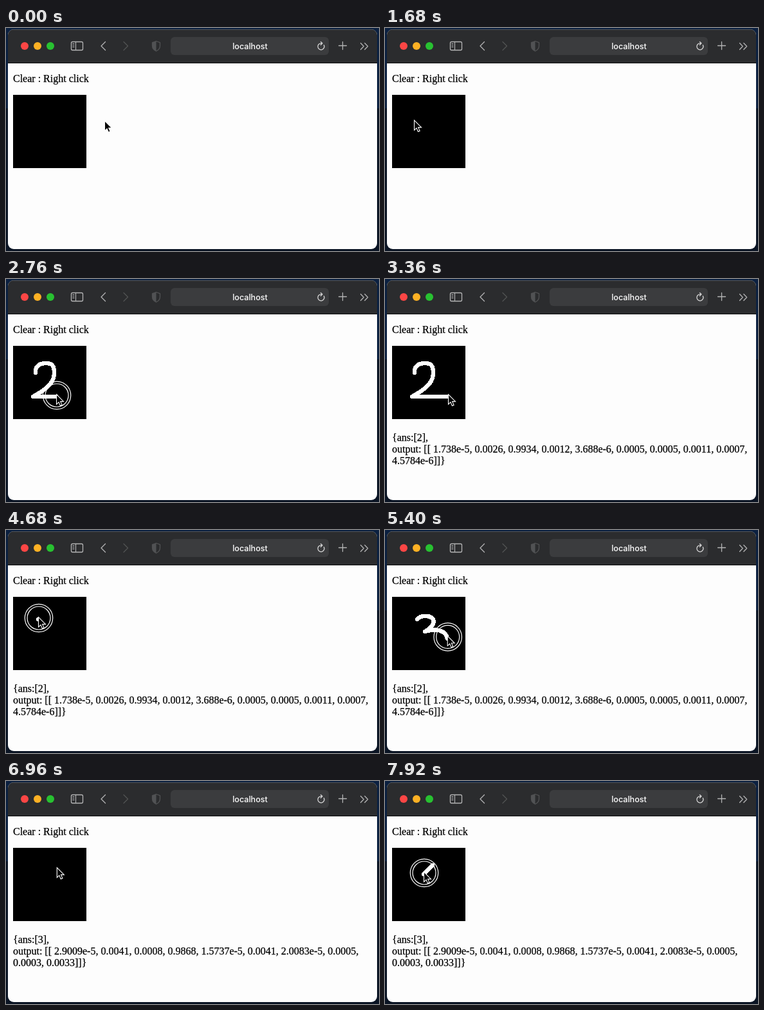
These frames come from a looping animation (580x347 px, 8000 ms). An HTML page:

```html
<!DOCTYPE html>
<html lang="en">
<head>
<meta charset="utf-8">
<title>Digit recognition demo</title>
<style>
  html, body { margin: 0; width: 100%; height: 100%; overflow: hidden; background: #0a1424; }
  svg { display: block; width: 580px; height: 347px; }
  .page { font: 16px "Liberation Serif", serif; stroke: #000; stroke-width: .25; white-space: pre; }
  .address { font: 500 12.6px Inter, sans-serif; fill: #fff; text-anchor: middle; }
  .icon { fill: none; stroke: #b4b4b5; stroke-width: 1.3; stroke-linecap: round; stroke-linejoin: round; }
  .dim { stroke: #515254; }
  #ink { fill: none; stroke: #fff; stroke-width: 6.5; stroke-linecap: round; stroke-linejoin: round; shape-rendering: crispEdges; }
</style>
</head>
<body>
<svg viewBox="0 0 580 347">
  <rect width="580" height="347" fill="#0a1424"/>
  <rect width="580" height="125" fill="#0b2040"/>

  <!-- Browser window -->
  <clipPath id="window"><rect x="3" y="2" width="574" height="342" rx="9"/></clipPath>
  <g clip-path="url(#window)">
    <rect width="580" height="347" fill="#fdfdfd"/>
    <rect width="580" height="54" fill="#2b2c2e"/>
    <rect y="2" width="580" height="1" fill="#555759"/>
    <rect y="54" width="580" height="1" fill="#0c0c0d"/>
  </g>
  <circle cx="29" cy="28" r="6" fill="#fc4645"/>
  <circle cx="49" cy="28" r="6" fill="#fdb124"/>
  <circle cx="69" cy="28" r="6" fill="#28c131"/>
  <g class="icon">
    <rect x="101.5" y="21.5" width="18" height="13" rx="2"/>
    <path d="M108.5 21.5v13M103.8 24.5h2.2M103.8 27h2.2M103.8 29.5h2.2" stroke-width="1.1"/>
    <path d="M154.5 21.5l-6.5 6.5 6.5 6.5"/>
    <path class="dim" d="M183 21.5l6.5 6.5-6.5 6.5"/>
    <path class="dim" d="M233.5 20.5l6 2.2v5.3q0 5-6 8-6-3-6-8v-5.3z"/>
  </g>
  <path d="M233.5 20.5l-6 2.2v5.3q0 5 6 8z" fill="#515254"/>
  <rect x="256" y="14" width="246" height="28" rx="6" fill="#3b3c3e"/>
  <text class="address" x="379.5" y="33">localhost</text>
  <g class="icon">
    <path d="M494.4 26.6a5 5 0 1 1-4.4-2.8h1.6M489.4 21.4l2.5 2.4-2.5 2.4" stroke="#d8d8d8"/>
    <path d="M523.5 21.5v12M517.5 27.5h12"/>
    <path d="M551.5 23.5l4.8 5-4.8 5M557.8 23.5l4.8 5-4.8 5"/>
  </g>

  <!-- Page -->
  <g class="page">
    <text x="11" y="84">Clear : Right click</text>
    <text id="line0" x="11" y="252"></text>
    <text id="line1" x="11" y="270"></text>
    <text id="line2" x="11" y="288"></text>
  </g>
  <rect x="11" y="104" width="114" height="114"/>
  <path id="ink"/>

  <!-- Pointer: its tip sits just above the brush -->
  <g id="pointer">
    <g id="ring" fill="none" stroke="#fff" stroke-width="1.2">
      <circle cx="1" cy="-2" r="21.7"/>
      <circle cx="1" cy="-2" r="18"/>
    </g>
    <path d="M.5-3.5v15.4l3.5-3.3 2.4 5.6 2.7-1.1-2.4-5.5h4.8z" stroke="#fff" stroke-width="1.1"/>
  </g>
</svg>

<script>
const LOOP = 8000, STEP = 120;

// Each leg moves the brush along a path. Legs with `up` draw until the button is
// released, and their ink stays until `clear`.
const legs = [
  { start: 840, end: 1440, path: "M153 148L45 147" },
  { start: 1800, end: 2900, up: 3360, clear: 4080,
    path: "M46 146C45 136 52 131 62 131S75 135 75 146S70 168 42 183H98" },
  { start: 3480, end: 4440, path: "M98 183L50 139" },
  { start: 4680, end: 5880, up: 6120, clear: 6600,
    path: "M50 139C55 133 67 132 73 137S74 152 62 158C82 152 97 157 97 172S90 187 76 187S56 188 48 186" },
  { start: 6240, end: 7440, path: "M48 186Q92 130 74 131" },
  { start: 7800, end: 7920, up: LOOP, clear: LOOP, path: "M74 131L60 145" },
];

const results = [
  { start: 0, lines: ["", "", ""] },
  { start: 3360, lines: [
    "{ans:[2],",
    "output: [[ 1.738e-5, 0.0026, 0.9934, 0.0012, 3.688e-6, 0.0005, 0.0005, 0.0011, 0.0007,",
    "4.5784e-6]]}"] },
  { start: 6120, lines: [
    "{ans:[3],",
    "output: [[ 2.9009e-5, 0.0041, 0.0008, 0.9868, 1.5737e-5, 0.0041, 2.0083e-5, 0.0005,",
    "0.0003, 0.0033]]}"] },
];

const byId = id => document.getElementById(id);
const latest = (list, t) => list.filter(item => item.start <= t).pop() || list[0];

for (const leg of legs) {
  leg.curve = document.createElementNS("http://www.w3.org/2000/svg", "path");
  leg.curve.setAttribute("d", leg.path);
  leg.length = leg.curve.getTotalLength();
}

// Drawing keeps a steady speed; free moves slow down towards their end.
function distance({ start, end, up, length }, t) {
  const u = Math.min(1, Math.max(0, (t - start) / (end - start)));
  return length * (up ? u : u * (2 - u));
}

function draw(t) {
  const leg = latest(legs, t);
  const { x, y } = leg.curve.getPointAtLength(distance(leg, t));
  byId("pointer").setAttribute("transform", `translate(${x} ${y})`);

  const stroke = legs.find(s => s.up && s.start <= t && t < s.clear);
  byId("ring").setAttribute("visibility", stroke && t < stroke.up ? "visible" : "hidden");
  byId("ink").setAttribute("d", stroke ? stroke.path : "");
  if (stroke) byId("ink").setAttribute("stroke-dasharray", `${distance(stroke, t)} 999`);

  latest(results, t).lines.forEach((line, i) => byId("line" + i).textContent = line);
}

const origin = performance.now();
function tick() {
  const t = (performance.now() - origin) % LOOP;
  draw(Math.floor(t / STEP) * STEP);
  requestAnimationFrame(tick);
}
tick();
</script>
</body>
</html>
```
